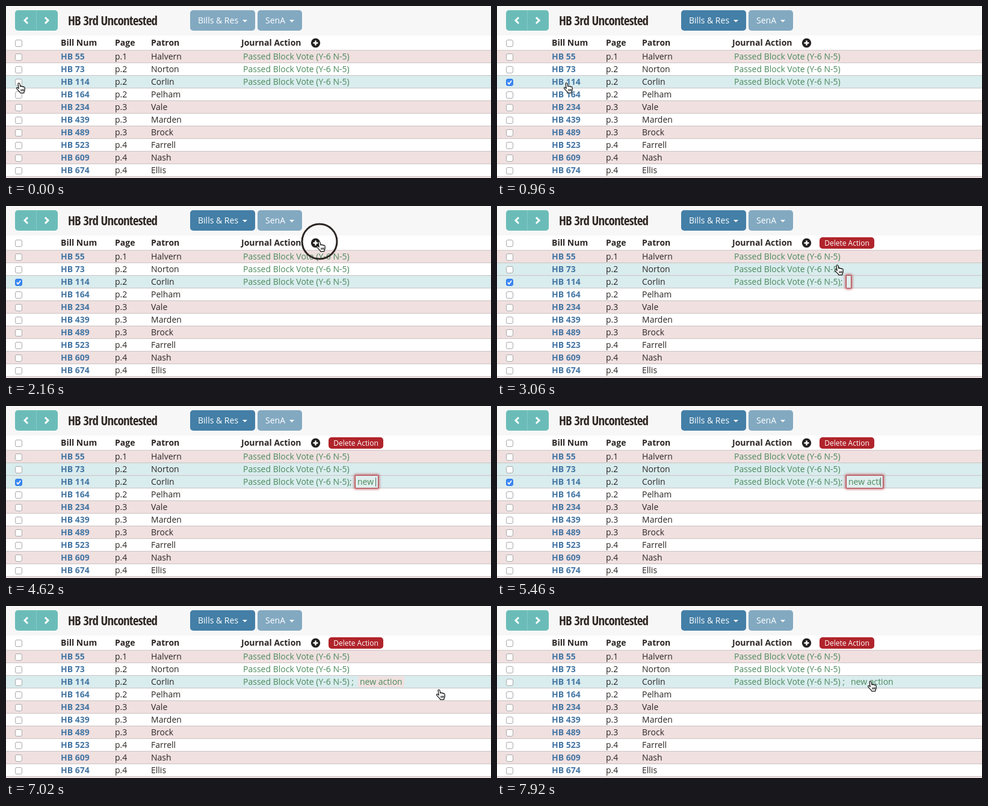
These frames come from a looping animation (806 px wide and 286 px high, 7980 ms). An HTML page:

```html
<!DOCTYPE html>
<html lang="en">
<head>
<meta charset="utf-8">
<title>Bill list</title>
<style>
  html, body { margin: 0; width: 100%; height: 100%; overflow: hidden; background: #fff; }
  #app { position: relative; width: 806px; height: 286px; overflow: hidden; color: #2c2624;
    font: 14px/21px "Open Sans", "Noto Sans", sans-serif; white-space: pre; }
  :where(#app *) { position: absolute; left: 0; top: 0; box-sizing: border-box; }
  b { font-weight: 700; }
  .bar { width: 806px; height: 49px; background: #f7f7f7; }
  h1 { left: 103px; top: 10px; margin: 0; color: #2f2723; letter-spacing: -.8px;
    font: 700 21px/28px Oswald, "Open Sans Condensed", "Open Sans", sans-serif; font-stretch: 75%; }
  .nav { left: 15px; top: 7px; width: 71px; height: 34px; border-radius: 5px; background: #6bbcb8; }
  .btn { top: 7px; height: 34px; padding-left: 13px; border-radius: 5px; color: #fff;
    line-height: 34px; background: #83a9c1; }
  .btn i { left: auto; right: 13px; top: 16px; border: 4px solid transparent; border-top-color: #fff; border-bottom: 0; }
  .active #bills { background: #447fa7; }

  .row { width: 806px; height: 21px; border-bottom: 1px solid #cbc3c3; }
  .row > b, .row > span { top: -1px; }
  .row:nth-child(odd) { background: #f0e0e0; }
  .row b { left: 91px; color: #4476a4; }
  #rows .picked, .hover #rows .next { background: #d9ecee; }
  .head { top: 50px; width: 806px; height: 24px; border-bottom: 1px solid #cfc9c9; }
  .box { left: 15px; width: 12px; height: 12px; border: 1px solid #a9a9a9;
    border-radius: 3px; background: #fff; }
  .box svg { left: -1px; top: -1px; display: none; }
  .checked .picked .box { border-color: #2f7be6; background: #3b87f2; }
  .checked .picked .box svg { display: block; }
  .page { left: 181px; }
  .patron { left: 241px; }
  .vote { left: 394px; color: #4a8a5c; }

  #delete { left: 536px; top: 52px; width: 91px; height: 19px; border-radius: 5px; color: #fff;
    background: #b0242b; font-size: 12px; line-height: 19px; text-align: center; visibility: hidden; }
  #field { left: 580px; top: 115px; height: 22px; min-width: 9px; padding: 0 3px;
    border: 1px solid #b4464c; box-shadow: 0 0 4px 1px #b8444b; background: #e0eeee;
    color: #4a8a5c; line-height: 20px; visibility: hidden; }
  #caret { left: auto; right: 3px; top: 3px; width: 1px; height: 15px; background: #4a6a58; }
  #typed { position: static; }
  #saved { left: 585px; top: 117px; height: 18px; padding: 0 3px; color: #4a8a5c;
    line-height: 18px; visibility: hidden; animation: glow 7980ms linear infinite; }
  .added #delete, .editing #field, .done #saved { visibility: visible; }

  #pointer { overflow: visible; animation: travel 7980ms infinite; }
  #hand { animation: hide 7980ms step-end infinite; }
  #ring { fill: none; stroke: #2b2523; stroke-width: 3; vector-effect: non-scaling-stroke;
    opacity: 0; animation: pulse 7980ms linear infinite; }
  @keyframes travel {
    0%, 7.5% { transform: translate(16px, 127px); animation-timing-function: cubic-bezier(.5, 0, .8, .8); }
    18.05% { transform: translate(467px, 126px); animation-timing-function: cubic-bezier(.2, .2, .5, 1); }
    25.5%, 33.8% { transform: translate(515px, 58px); animation-timing-function: ease-in-out; }
    37.6%, 81.2% { transform: translate(560px, 97px); animation-timing-function: ease-in-out; }
    87.2%, 89.5% { transform: translate(714px, 138px); animation-timing-function: ease-in-out; }
    95.2%, 100% { transform: translate(615px, 124px); }
  }
  @keyframes hide { 0% { opacity: 1; } 48.9% { opacity: 0; } 82% { opacity: 1; } }
  @keyframes pulse {
    0%, 1.5% { opacity: 0; transform: scale(.2); }
    1.51% { opacity: 1; transform: scale(.2); }
    3%, 3.4% { opacity: 1; transform: scale(1); }
    4.5%, 25.5% { opacity: 0; transform: scale(1.2); }
    25.56% { opacity: 1; transform: scale(.2); }
    27%, 27.4% { opacity: 1; transform: scale(1); }
    28.6%, 100% { opacity: 0; transform: scale(1.2); }
  }
  @keyframes glow {
    0%, 88.5% { background: #f0e0e0; }
    98%, 100% { background: #f0e0e000; }
  }
</style>
</head>
<body>
<div id="app">
  <div class="bar"></div>
  <div class="nav">
    <svg width="71" height="34" fill="none" stroke="#fff" stroke-width="3">
      <path d="M35.5 0V34" stroke="#82cac6" stroke-width="1"/>
      <path d="M21 12L16 17L21 22M50 12L55 17L50 22"/>
    </svg>
  </div>
  <h1>HB 3rd Uncontested</h1>
  <div class="btn" id="bills" style="left:306px;width:108px">Bills &amp; Res<i></i></div>
  <div class="btn" style="left:418px;width:74px">SenA<i></i></div>

  <div class="head">
    <span class="box" style="top:6px"></span>
    <b style="left:91px">Bill Num</b><b class="page">Page</b><b class="patron">Patron</b>
    <b style="left:391px">Journal Action</b>
    <svg style="left:506px;top:3px" width="17" height="17">
      <circle cx="8.5" cy="8.5" r="7.7" fill="#231f1e"/>
      <path d="M4.5 8.5H12.5M8.5 4.5V12.5" stroke="#fff" stroke-width="2.4"/>
    </svg>
  </div>
  <div id="rows"></div>
  <div id="delete">Delete Action</div>
  <div id="field"><span id="typed"></span><span id="caret"></span></div>
  <div id="saved">new action</div>

  <svg id="pointer" width="18" height="20">
    <g transform="translate(6 1)"><circle id="ring" r="29"/></g>
    <path id="hand" fill="#fff" stroke="#111" stroke-width="1.2" stroke-linejoin="round"
      d="M4 2.4C4 .6 6.4 .5 6.8 2.2L7.9 7C8.3 5.8 10 5.9 10.3 7.2C11 6.2 12.5 6.5 12.7 7.8C13.6 7 15 7.5 15.1 8.8C15.5 11.6 15.6 13.6 14 15.6L13.8 17.6H7.6L7 16C5.2 14.4 3.5 12.5 1.7 10.3C.9 9 2.4 7.9 3.6 8.9L5.2 10.3ZM8.9 11.5L9.2 14.6M11 11.4L11.2 14.5M13 11.3L13.1 14.4"/>
  </svg>
</div>
<script>
  const LOOP = 7980, TEXT = "new action", OPEN = 2240, SAVE = 6820;
  const FIRST_KEY = 4020, KEY_GAP = 187;
  const $ = id => document.getElementById(id);
  const app = $("app"), vote = "Passed Block Vote (Y-6 N-5)";
  const bills = [
    [55, 1, "Halvern"], [73, 2, "Norton"], [114, 2, "Corlin"], [164, 2, "Pelham"], [234, 3, "Vale"],
    [439, 3, "Marden"], [489, 3, "Brock"], [523, 4, "Farrell"], [609, 4, "Nash"], [674, 4, "Ellis"]
  ];
  const tick = '<svg width="12" height="12"><path d="M2.8 6.2L5 8.6L9.2 3.2" fill="none" stroke="#fff" stroke-width="1.8"/></svg>';

  $("rows").innerHTML = bills.map(([num, page, patron], i) =>
    `<div class="row ${["", "next", "picked"][i] || ""}" style="top:${74 + 21 * i}px">` +
    `<span class="box" style="top:5px">${tick}</span><b>HB ${num}</b><span class="page">p.${page}</span>` +
    `<span class="patron">${patron}</span>${i < 3 ? `<span class="vote">${vote}</span>` : ""}</div>`
  ).join("") + '<div class="row" style="top:284px"></div>';

  const pickedVote = document.querySelector(".picked .vote");
  const clock = $("pointer").getAnimations()[0];

  // Half-open intervals during which each state class applies.
  const states = {
    checked: [180, SAVE], active: [180, LOOP], added: [OPEN, LOOP],
    hover: [2820, 6780], editing: [OPEN, SAVE], done: [SAVE, LOOP]
  };

  function draw(now) {
    const t = Number(clock ? clock.currentTime : now) % LOOP;
    for (const [name, [from, to]] of Object.entries(states))
      app.classList.toggle(name, t >= from && t < to);

    const keys = Math.floor((t - FIRST_KEY) / KEY_GAP) + 1;
    const count = Math.max(0, Math.min(TEXT.length, keys));
    const lastKey = count ? FIRST_KEY + KEY_GAP * (count - 1) : OPEN;
    $("typed").textContent = TEXT.slice(0, count);
    $("caret").style.opacity = (t - lastKey) % 1000 < 500 ? 1 : 0;
    pickedVote.textContent = vote + (t < OPEN ? "" : t < SAVE ? ";" : " ;");
    requestAnimationFrame(draw);
  }
  draw(0);
</script>
</body>
</html>
```
